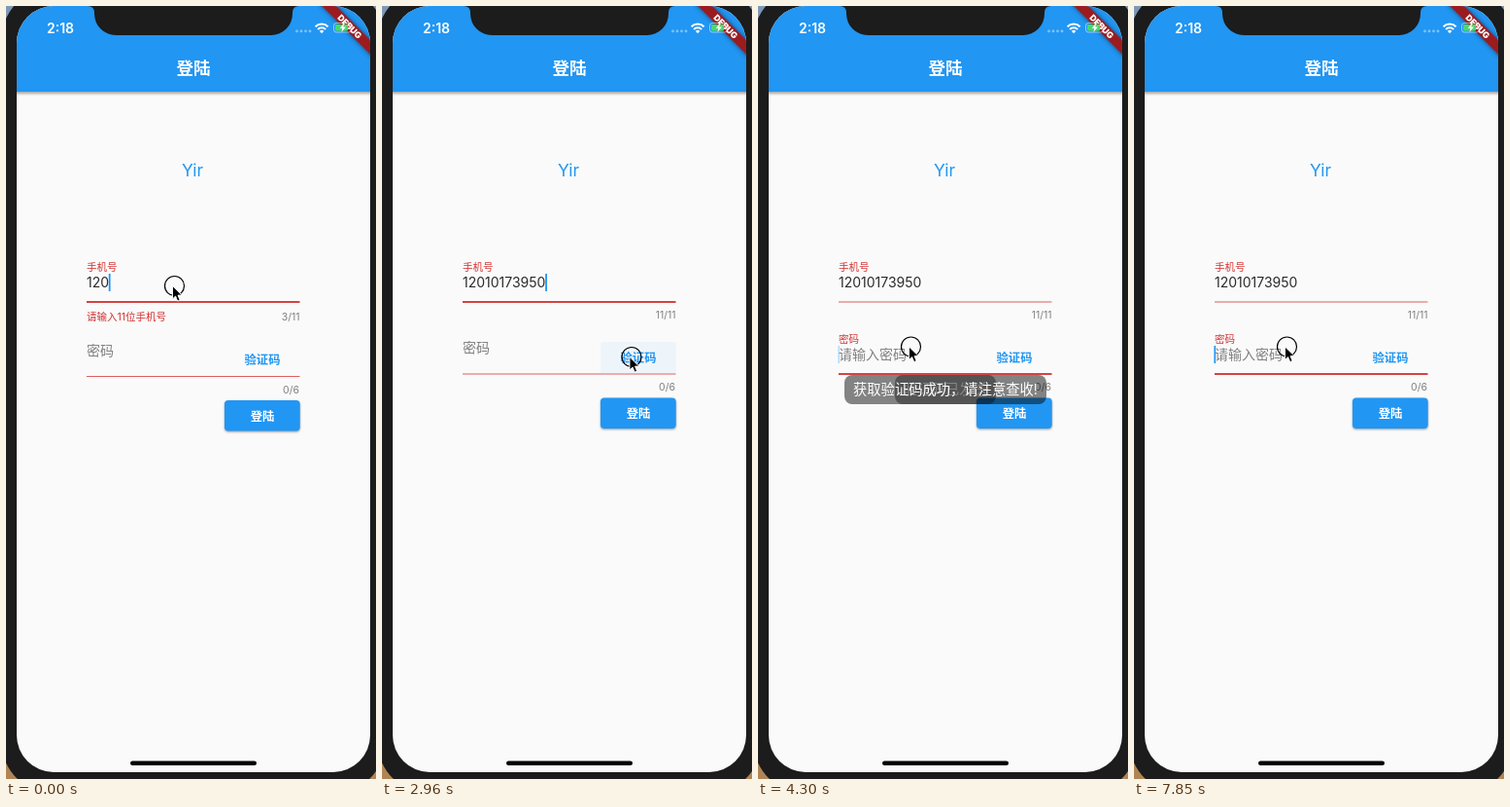
These frames come from a looping animation (381 by 794 pixels, 8 s). An HTML page:

```html
<!DOCTYPE html>
<html lang="zh">
<head>
<meta charset="utf-8">
<title>登陆</title>
<style>
html, body { margin: 0; height: 100%; overflow: hidden; background: #1c1c1c; }
svg { display: block; width: 100vw; height: 100vh; }
text { font-family: Inter, "Noto Sans CJK SC", "Noto Sans CJK", sans-serif; font-size: 14px; }
.small { font-size: 10.5px; }
.red { fill: #d32f2f; }
.grey { fill: #808080; }
.blue { fill: #2196f3; }
.white { fill: #fff; }
.mid { text-anchor: middle; }
.end { text-anchor: end; }
.action { font-size: 12.3px; font-weight: 600; text-anchor: middle; }
.toast text { font-size: 14.3px; text-anchor: middle; fill: #fff; }
.toast rect { fill: #000; fill-opacity: .48; }
.bar { filter: drop-shadow(0 2px 1.5px rgba(0,0,0,.35)); }
.raised { filter: drop-shadow(0 1px 1px rgba(0,0,0,.4)); }
.ribbon { filter: drop-shadow(0 0 2.5px rgba(0,0,0,.5)); }
</style>
</head>
<body>
<svg viewBox="0 0 381 794" preserveAspectRatio="none">
  <defs>
    <linearGradient id="desk" x2="0" y2="1">
      <stop offset="0" stop-color="#7c98b4"/>
      <stop offset="1" stop-color="#b08454"/>
    </linearGradient>
    <clipPath id="screen"><rect x="11" width="364" height="787" rx="38"/></clipPath>
  </defs>

  <rect width="381" height="794" fill="url(#desk)"/>
  <rect x="-5" y="-20" width="396" height="830" rx="56" fill="#1c1c1c"/>

  <g clip-path="url(#screen)">
    <rect width="381" height="794" fill="#fafafa"/>
    <rect class="blue bar" x="0" y="-10" width="386" height="98"/>
    <text class="white mid" x="193" y="70" style="font-size:17.5px;font-weight:600">登陆</text>
    <text class="blue mid" x="192" y="175" style="font-size:17.5px">Yir</text>

    <!-- phone field -->
    <text class="small red" x="83" y="272">手机号</text>
    <text id="phone" x="83" y="289" fill="#2b2b2b"></text>
    <rect id="phoneCaret" class="blue" y="275" width="1.8" height="18"/>
    <rect id="phoneLine" class="red" x="83" width="219.5"/>
    <text id="error" class="small red" x="83" y="323">请输入11位手机号</text>
    <text id="count" class="small grey end" x="302.5"></text>

    <!-- everything below moves up when the error goes away -->
    <g id="lower">
      <rect id="press" class="blue" x="225" y="347.5" width="78" height="32" rx="2"/>
      <text class="action blue" x="264" y="368">验证码</text>
      <text id="hint" class="grey" x="83" y="365.5">请输入密码</text>
      <text id="label">密码</text>
      <rect id="codeCaret" class="blue" x="82.4" y="351.5" width="1.8" height="18"/>
      <rect id="codeLine" class="red" x="83" width="219.5"/>
      <text class="small grey end" x="302" y="397.5">0/6</text>
      <rect class="blue raised" x="225" y="405" width="77.7" height="31.6" rx="4"/>
      <text class="action white" x="264" y="425.5">登陆</text>
    </g>

    <g id="sent" class="toast">
      <rect x="141" y="379" width="104" height="30" rx="8"/>
      <text x="193" y="399">验证码已发送</text>
    </g>
    <g id="done" class="toast">
      <rect x="89" y="379" width="208" height="30" rx="8"/>
      <text x="193" y="399">获取验证码成功，请注意查收!</text>
    </g>

    <g transform="translate(375) rotate(45)">
      <rect class="ribbon" x="-42" y="24.6" width="84" height="10.5" fill="#9c1b1f"/>
      <text class="white mid" y="33" style="font-size:8.9px;font-weight:900">DEBUG</text>
    </g>
    <path d="M84 0Q91 0 91 7V8A22 22 0 0 0 113 30H273A22 22 0 0 0 295 8V7Q295 0 302 0Z" fill="#1c1c1c"/>
    <rect x="128" y="775.5" width="130" height="4.6" rx="2.3"/>
  </g>

  <!-- status bar -->
  <text class="white" x="42" y="27.5" style="font-weight:600">2:18</text>
  <path d="M299.5 25.8h14" stroke="#fff" stroke-opacity=".4" stroke-width="3" stroke-linecap="round" stroke-dasharray="0 4.5"/>
  <g fill="none" stroke="#fff" stroke-width="2.1">
    <path d="M318.6 21.2a9.2 9.2 0 0 1 13 0"/>
    <path d="M321.1 23.9a5.7 5.7 0 0 1 8 0"/>
  </g>
  <path class="white" d="M325.1 28.2l-2.2-2.4a3.2 3.2 0 0 1 4.4 0z"/>
  <rect x="337.5" y="17.5" width="18" height="9.5" rx="2.6" fill="none" stroke="#fff" stroke-opacity=".5"/>
  <path d="M357 20.6v3.4" stroke="#fff" stroke-opacity=".5" stroke-width="1.4"/>
  <rect x="339" y="19" width="13" height="6.5" rx="1.3" fill="#4cd964"/>
  <path class="white" d="M348.2 17.5l-4.4 5.4h2.6l-1 4.2 4.6-5.6h-2.7z"/>

  <g id="pointer">
    <circle cx="2" cy="0" r="10" fill="none" stroke="#000" stroke-width="1.2"/>
    <path d="M0 0V13.4L3.1 10.5L5.2 15.6L7.6 14.6L5.5 9.6H9.7Z" stroke="#fff" stroke-width=".9" stroke-linejoin="round"/>
  </g>
</svg>
<script>
const LOOP = 8000, NUMBER = "12010173950";
const KEYS = [290, 440, 590, 730, 1030, 1480, 2080, 2370];
const FOCUS = 3390;
const $ = id => document.getElementById(id);
const set = (id, attrs) => { for (const k in attrs) $(id).setAttribute(k, attrs[k]); };
const ramp = (t, a, b) => Math.min(1, Math.max(0, (t - a) / (b - a)));
const ease = x => x * x * (3 - 2 * x);
const mix = (a, b, k) => a + (b - a) * k;
// rises over a..b, falls over c..d
const pulse = (t, a, b, c, d) => ramp(t, a, b) - ramp(t, c, d);

function underline(id, y, active) {
  const h = mix(0.9, 1.8, active);
  set(id, { y: y - h / 2, height: h, opacity: mix(0.85, 1, active) });
}

// solid after focus, then half a second off and on with soft edges
function blink(t) {
  if (t < FOCUS) return 0;
  if (t < 4160) return 1;
  const p = (t - 4160) % 1000;
  return 1 - pulse(p, 0, 200, 500, 700);
}

function draw(t) {
  const n = 3 + KEYS.filter(k => t >= k).length;
  const valid = n === NUMBER.length;
  const phone = $("phone");
  phone.textContent = NUMBER.slice(0, n);
  set("phoneCaret", { x: 83 + phone.getComputedTextLength() - 0.3, opacity: t < FOCUS ? 1 : 0 });
  $("count").textContent = n + "/11";
  set("count", { y: valid ? 321 : 322.5 });
  set("error", { opacity: 1 - ramp(t, 2340, 2520) });
  set("lower", { transform: `translate(0 ${valid ? -2.5 : 0})` });

  const k = ease(ramp(t, FOCUS, FOCUS + 200));
  underline("phoneLine", 304, 1 - k);
  underline("codeLine", 380.5, k);
  set("label", {
    x: 83, y: mix(358.5, 348.5, k),
    style: `font-size:${mix(14, 10.5, k)}px`,
    fill: `rgb(${mix(128, 211, k)},${mix(128, 47, k)},${mix(128, 47, k)})`
  });
  set("hint", { opacity: k });
  set("codeCaret", { opacity: blink(t) });

  set("press", { opacity: 0.05 * pulse(t, 2820, 2950, 3100, 3300) });
  set("sent", { opacity: pulse(t, 3050, 3200, 4250, 4450) });
  set("done", { opacity: pulse(t, 3540, 3690, 4680, 4980) });

  const go = ease(ramp(t, 2430, 2900)), back = ease(ramp(t, 3040, 3400));
  const x = mix(mix(171.5, 255, go), 155.5, back);
  const y = mix(mix(287.5, 360.5, go), 350, back);
  set("pointer", { transform: `translate(${x} ${y})` });
}

const start = performance.now();
function tick() {
  draw((performance.now() - start) % LOOP);
  requestAnimationFrame(tick);
}
tick();
</script>
</body>
</html>
```
